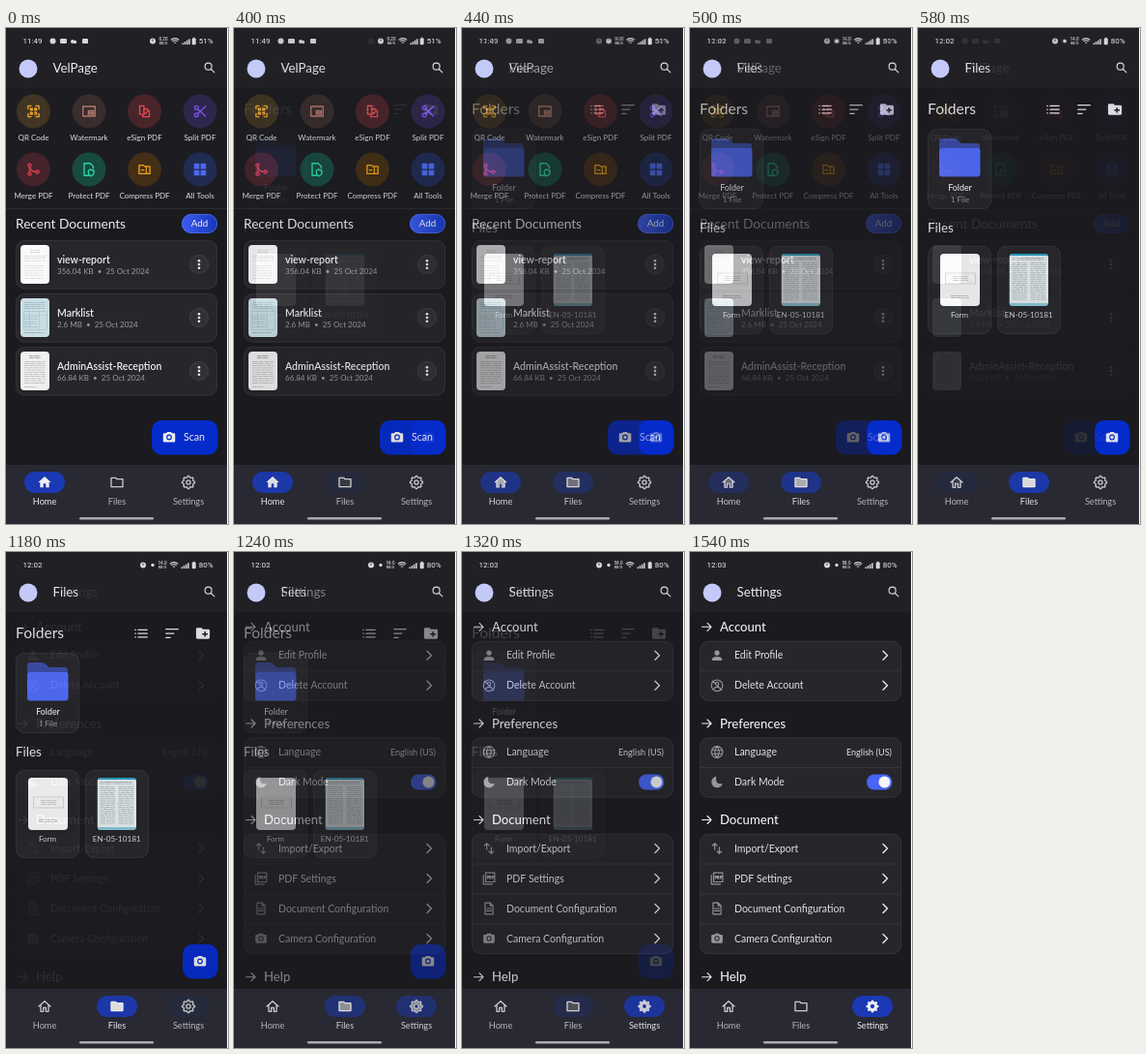
Write an HTML page with a canvas that moves like this. It is 230 by 512 pixels and loops after 2.74 s.

```html
<!DOCTYPE html>
<html lang="en">
<head>
<meta charset="utf-8">
<title>Document scanner</title>
<style>
html, body { margin: 0; width: 100%; height: 100%; overflow: hidden; background: #18181c; }
canvas { display: block; width: 230px; height: 512px; }
</style>
</head>
<body>
<canvas id="stage"></canvas>
<script>
const W = 230, H = 512, LOOP = 2740, STEP = 20, STEPS = 18;
const FADES = [400, 1180];
const DPR = window.devicePixelRatio || 1;
const WHITE = '#eeeef0', SOFT = '#c9c9cd', GREY = '#9b9ba0', BODY = '#1a1a1f', BAR = '#202025';

let c;

function makeCanvas(el) {
  el.width = W * DPR;
  el.height = H * DPR;
  const context = el.getContext('2d');
  context.scale(DPR, DPR);
  return context;
}

function rect(x, y, w, h, fill) {
  c.fillStyle = fill;
  c.fillRect(x, y, w, h);
}

function box(x, y, w, h, r, fill, stroke) {
  c.beginPath();
  c.roundRect(x, y, w, h, r);
  c.fillStyle = fill;
  c.fill();
  if (!stroke) return;
  c.beginPath();
  c.roundRect(x + .4, y + .4, w - .8, h - .8, r);
  c.strokeStyle = stroke;
  c.lineWidth = .8;
  c.stroke();
}

function dot(x, y, r, fill) {
  c.beginPath();
  c.arc(x, y, r, 0, Math.PI * 2);
  c.fillStyle = fill;
  c.fill();
}

function text(s, x, y, size, color = WHITE, align = 'left', weight = 400, family = 'Lato, "Open Sans", sans-serif') {
  c.font = `${weight} ${size}px ${family}`;
  c.textAlign = align;
  c.textBaseline = 'alphabetic';
  c.fillStyle = color;
  c.fillText(s, x, y + size * .35);
}

// Icons live on a 24-unit grid; line = 0 means filled.
function icon(name, x, y, size, color, line = 0) {
  const path = new Path2D(ICONS[name]);
  c.save();
  c.translate(x - size / 2, y - size / 2);
  c.scale(size / 24, size / 24);
  c.fillStyle = c.strokeStyle = color;
  c.lineWidth = line;
  c.lineCap = c.lineJoin = 'round';
  if (line) c.stroke(path);
  else c.fill(path, 'evenodd');
  c.restore();
}

function gear() {
  const points = Array.from({ length: 32 }, (_, i) => {
    const r = i % 4 < 2 ? 9.8 : 7.8, a = (i - .5) * Math.PI / 16;
    return `${12 + r * Math.cos(a)} ${12 + r * Math.sin(a)}`;
  });
  return `M${points.join('L')}Z` + ring(3.2);
}

function ring(r) {
  return `M${12 - r} 12a${r} ${r} 0 1 0 ${2 * r} 0a${r} ${r} 0 1 0 ${-2 * r} 0`;
}

const FOLDER = 'M3 5h7l2 2h9v12H3Z';
const CORNERS = 'M3 8V3h5M16 3h5v5M21 16v5h-5M8 21H3v-5';
const PAGE = 'M5 2h9l5 5v15H5ZM14 2v5h5';
const ICONS = {
  search: 'M16 9.5a6.5 6.5 0 1 1-13 0a6.5 6.5 0 0 1 13 0M14.5 14.5L21 21',
  home: 'M3 12L12 4l9 8M6 10v10h4v-6h4v6h4V10',
  homeFull: 'M10 20v-6h4v6h5v-8h3L12 3L2 12h3v8z',
  folder: FOLDER,
  folderFull: 'M4 4h6l2 2h8q2 0 2 2v10q0 2-2 2H4q-2 0-2-2V6q0-2 2-2',
  folderPlus: 'M4 4h6l2 2h8q2 0 2 2v10q0 2-2 2H4q-2 0-2-2V6q0-2 2-2M14 9v3h-3v2h3v3h2v-3h3v-2h-3V9Z',
  gear: gear(),
  camera: 'M9 3L7 5H4q-2 0-2 2v11q0 2 2 2h16q2 0 2-2V7q0-2-2-2h-3l-2-2Z' + ring(4.6) + ring(2.8),
  qr: CORNERS + 'M7 7h3v3H7ZM14 7h3v3h-3ZM7 14h3v3H7ZM14 14h3v3h-3',
  stamp: 'M2 4h20v16H2ZM11 11v6h8v-6ZM12 14h6',
  sign: 'M4 3h7v14H4ZM11 8h5l4 4v9H9v-4M13 16l4-4',
  cut: 'M9 6a3 3 0 1 1-6 0a3 3 0 0 1 6 0M9 18a3 3 0 1 1-6 0a3 3 0 0 1 6 0M8 8l13 12M8 16L21 4',
  merge: 'M8 5a2.5 2.5 0 1 1-5 0a2.5 2.5 0 0 1 5 0M8 19a2.5 2.5 0 1 1-5 0a2.5 2.5 0 0 1 5 0M21 16a2.5 2.5 0 1 1-5 0a2.5 2.5 0 0 1 5 0M5.5 8v8M5.5 8q2 7 10 8',
  protect: 'M11 22H4V2h10l5 5v3M14 12l6 2v4q-1 4-5 5q-4-2-4-5v-4Z',
  compress: FOLDER + 'M15 8v2M15 12v2M15 16v2M7 13h4',
  tiles: 'M2 2h9v9H2ZM13 2h9v9h-9ZM2 13h9v9H2ZM13 13h9v9h-9Z',
  list: 'M7 6h15M7 12h15M7 18h15M2 6h1M2 12h1M2 18h1',
  sort: 'M2 5h20M2 12h13M2 19h7',
  arrow: 'M2 12h19M13 4l8 8l-8 8',
  chevron: 'M8 3l9 9l-9 9',
  person: 'M16.5 7.5a4.5 4.5 0 1 1-9 0a4.5 4.5 0 0 1 9 0M3 21v-2q0-5 9-5t9 5v2Z',
  noPerson: ring(10) + 'M4 4l16 16M9 9q0-3 3-3t3 3q0 3-2 3M6 18q3-4 8-3',
  globe: ring(10) + 'M2.5 9h19M2.5 15h19M12 2q-8 10 0 20M12 2q8 10 0 20',
  moon: 'M11 2a10 10 0 1 0 11 12q-8 3-11-3q-2-5 0-9',
  transfer: 'M8 14V3M4 7l4-4l4 4M16 10v11M12 17l4 4l4-4',
  pdf: 'M6 2h16v16H6ZM2 6v16h16M9 12V8h2v2H9M13 8v4h2V8ZM18 12V8h2M18 10h2',
  page: PAGE + 'M8 12h8M8 16h8'
};

function statusBar(time, battery, speed, early) {
  const sans = 'Roboto, sans-serif', tint = '#d8d8da';
  text(time, 17.5, 13.5, 8, WHITE, 'left', 400, sans);
  if (early) {
    dot(48.5, 13.5, 3, tint);
    box(56, 11, 7, 5, 1.2, tint);
    dot(69, 14, 2, tint);
    dot(71.5, 14.5, 1.7, tint);
    box(79, 11, 6, 5, .8, tint);
  }
  const alarm = early ? 152 : 142, x = early ? 163 : 162;
  dot(alarm, 13.5, 3, tint);
  rect(alarm - .4, 11.5, .8, 2.4, '#222');
  if (!early) dot(152, 13.5, 1.7, tint);
  text(speed, x, 11.5, 4.6, tint, 'center', 500, sans);
  text('KB/S', x, 15.7, 3.8, tint, 'center', 500, sans);
  const wifi = early ? 175 : 174;
  c.strokeStyle = tint;
  c.lineWidth = 1.1;
  for (const r of [1.5, 3.7, 5.9]) {
    c.beginPath();
    c.arc(wifi, 16.5, r, -Math.PI * .75, -Math.PI * .25);
    c.stroke();
  }
  for (let i = 0; i < 4; i++) rect(wifi + 7.5 + i * 2.2, 15.5 - i * 1.4, 1.5, 1.6 + i * 1.4, tint);
  box(192.7, 10.5, 4, 6.8, 1, tint);
  rect(193.9, 9.7, 1.6, 1, tint);
  text(battery, 214.5, 13.5, 8, WHITE, 'right', 400, sans);
}

function frame(title, time, battery, speed, active) {
  rect(0, 0, W, H, BODY);
  rect(0, 0, W, 62, BAR);
  statusBar(time, battery, speed, active === 0);
  dot(23, 42, 9.5, '#c3caf8');
  text(title, 48.5, 41, 13.3);
  icon('search', 211, 41, 13, '#dcdce0', 2.1);
}

function navBar(active) {
  rect(0, 451, W, 61, '#282932');
  const items = [['Home', 'home', 40], ['Files', 'folder', 115], ['Settings', 'gear', 189]];
  items.forEach(([label, name, x], i) => {
    const on = i === active;
    if (on) box(x - 21, 458, 42, 22, 11, '#1b39b4');
    const full = name === 'gear' ? name : name + 'Full';
    icon(on ? full : name, x, 469, 16, on ? WHITE : SOFT, on ? 0 : 2);
    text(label, x, 488.7, 9.2, on ? WHITE : '#b4b4bb', 'center');
  });
  box(76, 505, 77, 2.4, 1.2, '#a9a9ae');
  rect(W - 1, 0, 1, H, '#fff');
}

function card(x, y, w, h) {
  box(x, y, w, h, 9, '#26262b', '#38383d');
}

// Rows of broken strokes that read as tiny print.
function print(x, y, w, rows, gap, color, seed) {
  for (let i = 0; i < rows; i++) {
    for (let dx = 0; dx < w;) {
      const n = Math.abs(Math.sin((i + seed) * 12.9 + dx * 7.3));
      const run = Math.min(1 + n * 5, w - dx);
      rect(x + dx, y + i * gap, run, .6, color);
      dx += run + .8;
    }
  }
}

function sheet(x, y, w, h, fill, paint) {
  c.save();
  c.beginPath();
  c.roundRect(x, y, w, h, 4);
  c.clip();
  rect(x, y, w, h, fill);
  paint(x, y);
  c.restore();
}

const reportSheet = (x, y) => {
  print(x + 10, y + 5, 10, 2, 2, '#c2c2c2', 1);
  print(x + 4, y + 11, 22, 3, 2.4, '#c9c9c9', 3);
  print(x + 4, y + 21, 20, 6, 2.6, '#d3d3d3', 8);
};
const marksSheet = (x, y) => {
  print(x + 4, y + 4, 21, 4, 2, '#8fabb5', 2);
  for (const dy of [13, 17, 32]) rect(x + 3, y + dy, 24, .5, '#9db9c2');
  for (const dx of [3, 9, 19, 27]) rect(x + dx, y + 13, .5, 19, '#9db9c2');
  print(x + 4, y + 19, 14, 5, 2.5, '#9ab4bd', 4);
  print(x + 4, y + 35, 20, 1, 2, '#7f9aa5', 5);
};
const adminSheet = (x, y) => {
  print(x + 9, y + 4, 12, 2, 2, '#777', 2);
  print(x + 4, y + 10, 22, 11, 2.2, '#a5a5a5', 5);
  print(x + 4, y + 36, 12, 1, 2, '#aaa', 7);
};
const formSheet = (x, y) => {
  c.strokeStyle = '#c4c4c4';
  c.lineWidth = .6;
  c.strokeRect(x + 5.5, y + 20, 31, 11);
  print(x + 13, y + 23, 16, 3, 2.2, '#b0b0b0', 3);
  print(x + 11, y + 43, 19, 2, 2.1, '#9a9fac', 6);
};
const datasheet = (x, y) => {
  rect(x, y, 41, 2, '#29a4c8');
  print(x + 3, y + 4, 33, 2, 1.8, '#7f8d94', 1);
  for (const dx of [3, 22]) {
    print(x + dx, y + 9, 15.5, 19, 2.1, '#8fa2ab', 4 + dx);
  }
  rect(x, y + 51, 41, 3, '#8ccbdb');
};

function cameraButton(x, label) {
  box(x, 405, 219.5 - x, 35.5, 10, '#052bcb');
  icon('camera', x + 18, 422.5, 15, WHITE);
  if (label) text(label, 184, 422.5, 10.6);
}

function home() {
  frame('VelPage', '11:49', '51%', '0.20', 0);
  rect(0, 62, W, 124, '#1c1c21');
  rect(0, 186, W, .8, '#303035');
  const tools = [
    ['QR Code', 'qr', '#413422', '#e9a52c'], ['Watermark', 'stamp', '#392d2d', '#b27a6c'],
    ['eSign PDF', 'sign', '#482529', '#e1494f'], ['Split PDF', 'cut', '#2d274b', '#7d51f2'],
    ['Merge PDF', 'merge', '#44232a', '#d9404f'], ['Protect PDF', 'protect', '#184a40', '#2ad8a4'],
    ['Compress PDF', 'compress', '#432f16', '#eda01c'], ['All Tools', 'tiles', '#202b52', '#4b69ee']
  ];
  tools.forEach(([label, name, back, tint], i) => {
    const x = 28.5 + (i % 4) * 57.5, y = i < 4 ? 86 : 146;
    dot(x, y, 17.5, back);
    icon(name, x, y, 15, tint, name === 'tiles' ? 0 : 2.2);
    text(label, x, y + 27.3, 8, '#dedee1', 'center');
  });

  text('Recent Documents', 10, 202, 13.7);
  const blue = c.createLinearGradient(182, 0, 219, 0);
  blue.addColorStop(0, '#3c5cf0');
  blue.addColorStop(1, '#1737b8');
  box(182, 192, 37, 20, 10, blue, '#5270e8');
  text('Add', 200.5, 202, 9.8, WHITE, 'center');

  const docs = [
    ['view-report', '356.04 KB', '#fafafa', reportSheet],
    ['Marklist', '2.6 MB', '#c9dde3', marksSheet],
    ['AdminAssist-Reception', '66.84 KB', '#f0f0f0', adminSheet]
  ];
  docs.forEach(([name, size, paper, paint], i) => {
    const y = 219 + i * 55;
    card(10, y, 209, 50.5);
    sheet(15, y + 5, 30, 40, paper, paint);
    text(name, 53, y + 20, 10.5, WHITE, 'left', 600);
    text(`${size}  •  25 Oct 2024`, 53, y + 32.3, 8, GREY);
    box(190, y + 15, 20, 20, 10, '#303035', '#424247');
    for (const dy of [-3.8, 0, 3.8]) dot(200, y + 25 + dy, 1.3, WHITE);
  });
  cameraButton(151, 'Scan');
  navBar(0);
}

function files() {
  frame('Files', '12:02', '80%', '14.0', 1);
  text('Folders', 10, 84, 15.6);
  icon('list', 140, 84, 15, WHITE, 2);
  icon('sort', 172, 84, 15, WHITE, 2);
  icon('folderPlus', 204, 84, 17, WHITE);

  card(10, 104, 66, 83);
  c.fillStyle = '#3c4da8';
  c.fill(new Path2D('M22 140V117q0-3 3-3h12q2 0 3 1l5 4h16q3 0 3 3v18Z'));
  box(22, 124, 42.5, 29.5, 3, '#506eff');
  text('Folder', 43.5, 165.3, 8.8, WHITE, 'center', 600);
  text('1 File', 43.5, 176.7, 8, GREY, 'center');

  text('Files', 10, 206, 13.4);
  card(10, 225, 66, 91);
  card(82, 225, 66, 91);
  sheet(23, 233, 41, 54, '#fdfdfd', formSheet);
  sheet(94.5, 233, 40.5, 54, '#eef3f4', datasheet);
  text('Form', 43, 295.7, 8, '#dedee1', 'center');
  text('EN-05-10181', 114.7, 295.7, 8.1, '#dedee1', 'center');
  cameraButton(183);
  navBar(1);
}

function group(title, y, rows) {
  icon('arrow', 17.5, y, 12, WHITE, 2.2);
  text(title, 31, y, 13.1, WHITE, 'left', 500);
  if (!rows.length) return;
  const top = y + 14.5, pitch = 31;
  card(10, top, 209, rows.length * pitch);
  rows.forEach(([label, name, filled], i) => {
    const mid = top + i * pitch + 15;
    if (i) rect(10.5, top + i * pitch - .4, 208, .8, '#39393e');
    icon(name, 28, mid, 14, '#95959b', filled ? 0 : 2);
    text(label, 46, mid, 10.5, '#e2e2e5');
    if (label === 'Language') {
      text('English (US)', 209, mid, 9.1, '#e2e2e5', 'right');
    } else if (label === 'Dark Mode') {
      box(183, mid - 8, 26.5, 16, 8, '#4665f3');
      dot(201.5, mid, 6, '#f5f5fa');
    } else {
      icon('chevron', 202, mid, 12, WHITE, 2.6);
    }
  });
}

function settings() {
  frame('Settings', '12:03', '80%', '58.0', 2);
  group('Account', 77.3, [['Edit Profile', 'person', true], ['Delete Account', 'noPerson']]);
  group('Preferences', 177, [['Language', 'globe'], ['Dark Mode', 'moon', true]]);
  group('Document', 276.5, [
    ['Import/Export', 'transfer'], ['PDF Settings', 'pdf'],
    ['Document Configuration', 'page'], ['Camera Configuration', 'camera', true]
  ]);
  group('Help', 438.7, []);
  navBar(2);
}

const screens = [home, files, settings].map(draw => {
  const layer = document.createElement('canvas');
  c = makeCanvas(layer);
  draw();
  return layer;
});
const stage = makeCanvas(document.getElementById('stage'));

// Stepped dissolve with a cubic ease-out, sampled at the middle of each step.
function dissolve(t, start) {
  if (t < start) return 0;
  const step = Math.floor((t - start) / STEP);
  return step >= STEPS ? 1 : 1 - (1 - (step + .5) / STEPS) ** 3;
}

const begin = performance.now();
function render() {
  const t = (performance.now() - begin) % LOOP;
  stage.globalAlpha = 1;
  stage.drawImage(screens[0], 0, 0, W, H);
  FADES.forEach((start, i) => {
    stage.globalAlpha = dissolve(t, start);
    stage.drawImage(screens[i + 1], 0, 0, W, H);
  });
  requestAnimationFrame(render);
}
render();
</script>
</body>
</html>
```
